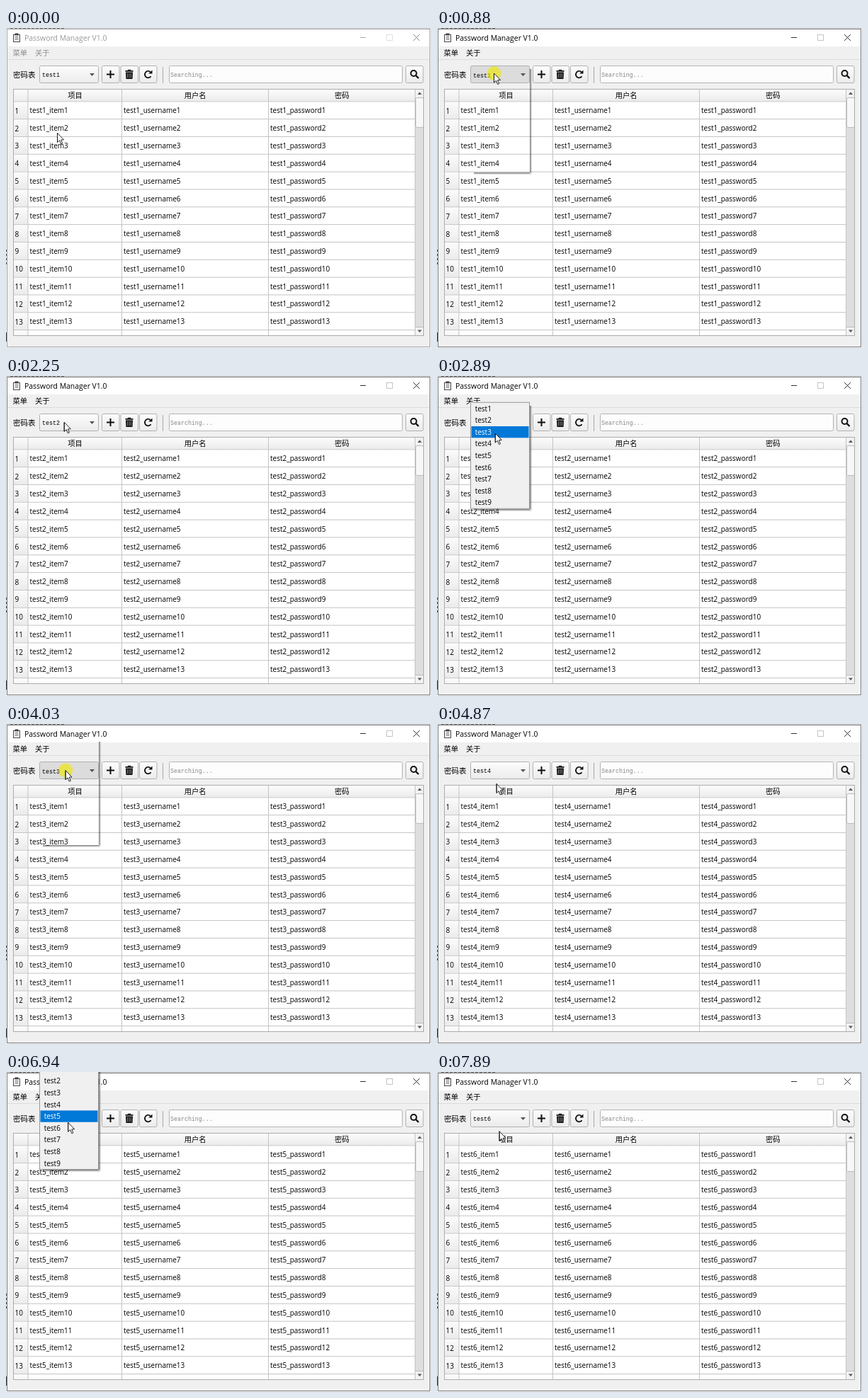
An HTML page with a canvas for the animation above (8000 ms loop, 600 by 452 pixels).

```html
<!DOCTYPE html>
<html lang="zh-CN">
<head>
<meta charset="utf-8">
<title>Password Manager</title>
<style>
html, body { margin: 0; width: 100%; height: 100%; overflow: hidden; background: #fff; }
canvas { display: block; width: 600px; height: 452px; }
</style>
</head>
<body>
<canvas id="stage" width="600" height="452"></canvas>
<script>
const ctx = document.getElementById('stage').getContext('2d');
const LOOP = 8000;
const SANS = '"Open Sans", "Noto Sans CJK SC", "Noto Sans CJK", sans-serif';
const CJK = '"Noto Sans CJK SC", "Noto Sans CJK", sans-serif';
const MONO = '"Liberation Mono", monospace';
const ITEM_H = 16.6, ROW_H = 24.83, ROWS_TOP = 103.3;
const COLUMNS = [30.5, 163, 370, 577];

// Each round: the box is clicked, then the next item is picked
const rounds = [[810, 1630], [2540, 3350], [3960, 4660], [5420, 6170], [6730, 7550]]
  .map(([press, pick], i) => ({ i, press, pick, show: press + 140, hide: pick + 70 }));

const within = (t, from, to) => t >= from && t < to;

function ease(t, start, length) {
  const k = Math.min(1, Math.max(0, (t - start) / length));
  return k * k * (3 - 2 * k);
}

// The pointer rests on the box, dips to the next item and returns, drifting right
function pointerAt(t) {
  const arrive = ease(t, 40, 370);
  let x = 72 + 8 * arrive;
  let y = 148 - 84.5 * arrive;
  for (const { i, show, pick } of rounds) {
    const down = ease(t, show + 40, 220), back = ease(t, pick + 190, 500);
    const boxY = n => 63.5 + 0.4 * n * n;
    const itemY = 82 + i;
    x += 1.8 * back;
    y += (itemY - boxY(i)) * down + (boxY(i + 1) - itemY) * back;
  }
  return [x, y];
}

function rect(x, y, w, h, fill) {
  ctx.fillStyle = fill;
  ctx.fillRect(x, y, w, h);
}

function text(s, x, mid, { size = 10, color = '#000', font = SANS, align = 'left' } = {}) {
  ctx.font = `${size}px ${font}`;
  ctx.fillStyle = color;
  ctx.textAlign = align;
  ctx.fillText(s, x, mid + size * 0.355);
}

function trace(points) {
  ctx.beginPath();
  points.forEach(([x, y]) => ctx.lineTo(x, y));
}

function line(points, color, width = 1) {
  trace(points);
  ctx.strokeStyle = color;
  ctx.lineWidth = width;
  ctx.stroke();
}

function poly(points, fill) {
  trace(points);
  ctx.fillStyle = fill;
  ctx.fill();
}

function arc(x, y, r, color, width, from = 0, to = 7) {
  ctx.beginPath();
  ctx.arc(x, y, r, from, to);
  ctx.strokeStyle = color;
  ctx.lineWidth = width;
  ctx.stroke();
}

function outline(x, y, w, h, color) {
  ctx.strokeStyle = color;
  ctx.lineWidth = 1;
  ctx.strokeRect(x + 0.5, y + 0.5, w - 1, h - 1);
}

// Filled triangle pointing down, or up for a negative height
function arrow(x, y, half, h) {
  poly([[x - half, y], [x + half, y], [x, y + h]], '#555');
}

function shade(y, h, top, bottom) {
  const g = ctx.createLinearGradient(0, y, 0, y + h);
  g.addColorStop(0, top);
  g.addColorStop(1, bottom);
  return g;
}

function box(x, y, w, h, fill, stroke = '#b0b0b0') {
  ctx.beginPath();
  ctx.roundRect(x + 0.5, y + 0.5, w - 1, h - 1, 2);
  ctx.fillStyle = fill;
  ctx.fill();
  ctx.strokeStyle = stroke;
  ctx.lineWidth = 1;
  ctx.stroke();
}

function drawFrame(active) {
  rect(0, 0, 600, 452, '#fff');
  rect(0, 0, 600, 1, '#d8d8d8');
  for (let x = 6; x < 84; x += 6) rect(x, 0, 4, 1, '#77706a');
  for (let y = 313; y < 332; y += 6) rect(0, y, 2, 3, '#56566e');
  rect(0, 430, 2, 13, '#3c3c48');
  rect(1, 1, 598, 450, active ? '#777' : '#a0a0a0');
  rect(2, 2, 596, 448, '#f0f0f0');
  rect(2, 2, 596, 24, '#fff');
  rect(2, 44, 596, 1, '#dcdcdc');

  outline(10, 9, 10, 11, '#444');
  rect(12.5, 7.5, 5, 3, '#444');
  for (let y = 12.5; y < 18; y += 2) line([[12.5, y], [17.5, y]], '#555', 0.8);
  text('Password Manager V1.0', 26, 13.8, { size: 10.45, color: active ? '#000' : '#999' });

  const close = active ? '#333' : '#888';
  line([[500, 13.5], [508, 13.5]], active ? '#333' : '#aaa');
  outline(537, 9, 9, 9, active ? '#c4c4c4' : '#e0e0e0');
  line([[575, 9], [584, 18]], close);
  line([[584, 9], [575, 18]], close);

  const menu = { size: 10.3, font: CJK, color: active ? '#000' : '#8c8c8c' };
  text('菜单', 9.5, 35.4, menu);
  text('关于', 41, 35.4, menu);
}

function drawPlus(x, y) {
  line([[x - 5.5, y], [x + 5.5, y]], '#111', 2);
  line([[x, y - 5.5], [x, y + 5.5]], '#111', 2);
}

function drawBin(x, y) {
  rect(x - 5.5, y - 6, 11, 1.7, '#111');
  rect(x - 2.2, y - 7.2, 4.4, 1.5, '#111');
  poly([[x - 5, y - 3.5], [x + 5, y - 3.5], [x + 4.5, y + 6], [x - 4.5, y + 6]], '#111');
  for (let d = -2.4; d < 3; d += 2.4) line([[x + d, y - 2], [x + d, y + 4.5]], '#aaa', 0.8);
}

function drawReload(x, y) {
  arc(x, y, 4.7, '#111', 1.8, 0.6, 5.5);
  poly([[x + 5.8, y - 6.2], [x + 5.8, y - 1], [x + 0.6, y - 1]], '#111');
}

function drawLens(x, y) {
  arc(x, y, 4, '#111', 2);
  line([[x + 3, y + 3], [x + 7, y + 7]], '#111', 2.4);
}

function drawTools(name, pressed) {
  const face = shade(53, 25, '#fdfdfd', '#ebebeb');
  text('密码表', 10, 66, { size: 10.5, font: CJK });
  box(47, 53, 84, 25, pressed ? '#dcdcdc' : face);
  text(name, 51, 66.5 + (pressed ? 0.7 : 0), { size: 8.4, font: MONO });
  arrow(121.5, 64, 3.5, 4);

  [135, 161.5, 188, 564].forEach(x => box(x, 53, 25.5, 25, face));
  drawPlus(147.5, 65.5);
  drawBin(174, 66);
  drawReload(200.7, 65.6);
  drawLens(575.5, 64);

  line([[221.5, 55], [221.5, 78]], '#a8a8a8');
  box(230, 53, 330, 25, '#fdfdfd', '#b4b4b4');
  text('Searching...', 232, 66.5, { size: 8.3, font: MONO, color: '#888' });
}

function drawTable(name) {
  const grid = '#c4c4c4';
  rect(10, 86, 580, 349, '#fff');
  ctx.save();
  ctx.beginPath();
  ctx.rect(10, 86, 568, 348);
  ctx.clip();
  rect(10, 86, 568, 17, shade(86, 17, '#fdfdfd', '#ececec'));
  for (let i = 0; i < 14; i++) {
    const y = ROWS_TOP + i * ROW_H, mid = y + 13.5;
    rect(10, y, 21, ROW_H, shade(y, ROW_H, '#fcfcfc', '#ebebeb'));
    rect(10, y, 568, 1, grid);
    if (i < 13) text(i + 1, 12.5, mid + 0.4);
    ['item', 'username', 'password'].forEach((key, c) => {
      if (i < 13) text(`${name}_${key}${i + 1}`, COLUMNS[c] + 3, mid);
    });
  }
  COLUMNS.forEach(x => rect(x, 86, 1, 349, grid));
  ['项目', '用户名', '密码'].forEach((s, c) =>
    text(s, (COLUMNS[c] + COLUMNS[c + 1]) / 2 + 0.7, 95.5, { size: 10.3, font: CJK, align: 'center' }));
  ctx.restore();

  rect(578, 86, 12, 349, '#dedede');
  rect(578, 86, 12, 12, '#f2f2f2');
  rect(578, 422, 12, 12, '#f2f2f2');
  box(578, 98, 12, 43, '#f7f7f7', '#bcbcbc');
  rect(578, 422, 12, 1, '#bcbcbc');
  arrow(584, 94, 3, -3.5);
  arrow(584, 426.5, 3, 3.5);
  outline(10, 86, 580, 349, '#acacac');
}

function drawShadow(top) {
  for (let i = 0; i < 3; i++) {
    const color = `rgba(0,0,0,${0.45 - i * 0.16})`;
    rect(131 + i, top + 5, 1, 146 + i, color);
    rect(52, top + 151 + i, 79 + i, 1, color);
  }
}

function drawPopup(top, y) {
  rect(47, top, 84, 151, '#989898');
  rect(48, top + 1, 82, 149, '#f0f0f0');
  const hot = Math.floor((y - top - 1) / ITEM_H);
  for (let i = 0; i < 9; i++) {
    const rowY = top + 1 + i * ITEM_H;
    if (i === hot) rect(48.5, rowY, 81, ITEM_H - 0.3, '#0078d7');
    text(`test${i + 1}`, 53.7, rowY + 8.3, { color: i === hot ? '#fff' : '#000' });
  }
}

function drawPointer(x, y, pressed) {
  if (pressed) {
    ctx.fillStyle = 'rgba(238,230,0,0.65)';
    ctx.beginPath();
    ctx.arc(x + 0.5, y + 0.5, 10, 0, 7);
    ctx.fill();
  }
  const shape = [[0, 0], [0, 13], [3, 10.3], [5.2, 15.5], [7.2, 14.6], [5.1, 9.6], [9, 9.4]]
    .map(([dx, dy]) => [x + 0.5 + dx, y + 0.5 + dy]);
  poly(shape, '#fff');
  line([...shape, shape[0], shape[1]], '#111', 0.9);
}

function draw(t) {
  const [x, y] = pointerAt(t);
  const boxPressed = rounds.some(r => within(t, r.press, r.show));
  const itemPressed = rounds.some(r => within(t, r.pick, r.pick + 120));
  const name = `test${1 + rounds.filter(r => t >= r.hide).length}`;
  const open = rounds.find(r => within(t, r.show - 70, r.hide));

  drawFrame(t >= rounds[0].press);
  drawTools(name, boxPressed);
  drawTable(name);
  if (open) {
    const top = 53.4 - open.i * ITEM_H;
    drawShadow(Math.round(top));
    if (t >= open.show) drawPopup(top, y);
  }
  drawPointer(x, y, boxPressed || itemPressed);
}

function tick() {
  draw(performance.now() % LOOP);
  requestAnimationFrame(tick);
}
tick();
</script>
</body>
</html>
```
